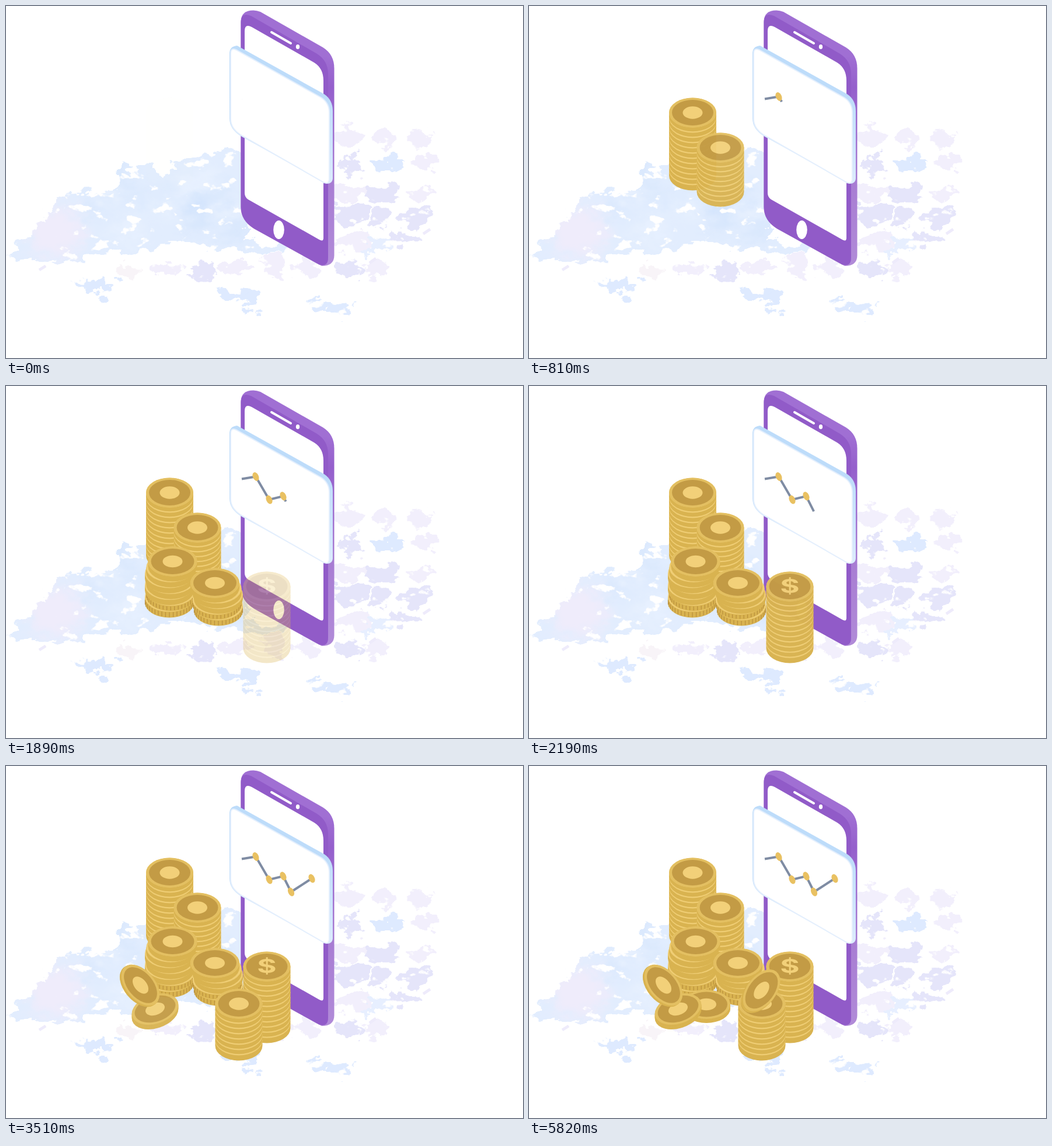
An HTML page that plays this animation: 886 by 604 pixels, repeating every 5850 ms.

```html
<!DOCTYPE html>
<html lang="en">
<head>
<meta charset="utf-8">
<title>Coins and phone</title>
<style>
  html, body { margin: 0; width: 100%; height: 100%; overflow: hidden; background: #fff; }
  svg { position: absolute; left: 0; top: 0; width: 886px; height: 604px; }
  #backdrop { will-change: transform; }
  text { font: 700 51px Inter, Arial, sans-serif; text-anchor: middle; }
</style>
</head>
<body>
<svg id="backdrop" viewBox="0 0 886 604">
  <defs>
    <filter id="ragged" filterUnits="userSpaceOnUse" x="0" y="180" width="886" height="380" color-interpolation-filters="sRGB">
      <feTurbulence type="fractalNoise" baseFrequency=".035 .05" numOctaves="4" seed="7" result="noise"/>
      <feDisplacementMap in="SourceGraphic" in2="noise" scale="44" xChannelSelector="R" yChannelSelector="G" result="torn"/>
      <feColorMatrix in="noise" values="0 0 0 0 0  0 0 0 0 0  0 0 0 0 0  0 0 14 0 -4"/>
      <feComposite in="torn" operator="in"/>
    </filter>
    <filter id="soft" x="-50%" y="-50%" width="200%" height="200%"><feGaussianBlur stdDeviation="12"/></filter>
    <clipPath id="cloudShape">
      <path id="cloud" d="M0 430Q60 375 95 322L190 318 195 270 270 285 355 247 410 258V402L475 405 470 430 300 408 80 441Z"/>
    </clipPath>
  </defs>
  <g filter="url(#ragged)">
    <use href="#cloud" fill="#e2edfe"/>
    <g clip-path="url(#cloudShape)"><g id="tints" filter="url(#soft)"></g></g>
    <g id="islands"></g>
  </g>
  <path stroke="#eeebfb" stroke-width="5" d="M57 453L68 446M715 391L727 383M623 441L634 433"/>
</svg>

<svg viewBox="0 0 886 604">
  <defs>
    <linearGradient id="phoneSide" x1="0" y1="0" x2="0" y2="1">
      <stop offset=".18" stop-color="#a06fd3"/><stop offset=".3" stop-color="#955fcc"/>
      <stop offset=".62" stop-color="#a67ad2"/><stop offset="1" stop-color="#b18bd8"/>
    </linearGradient>
    <linearGradient id="cardSide" x1="0" y1="0" x2="0" y2="1">
      <stop offset=".35" stop-color="#bddcfa"/><stop offset="1" stop-color="#dcebfd"/>
    </linearGradient>
  </defs>

  <path fill="url(#phoneSide)" d="M402.500 27Q402.500 7.500 424 7.500Q430 7.500 436 10L543 71Q562.500 83 562.500 107V428Q562.500 446 541 446L425 382Q402.500 368 402.500 345Z"/>
  <path fill="#915bc8" d="M402.500 28Q402.500 10 420 17L533 82Q552 94 552 117V432Q552 448 537 444L425 382Q402.500 368 402.500 345Z"/>
  <path fill="#fff" d="M409 43Q409 30 421 36L528 97Q544 107 544 128V398Q544 405 537 401L415 332Q409 328 409 321Z"/>
  <path stroke="#fff" stroke-width="4" stroke-linecap="round" d="M455 45L488 64"/>
  <ellipse cx="500" cy="70" rx="3.2" ry="4" fill="#fff"/>
  <ellipse cx="467.5" cy="384" rx="9.3" ry="16" fill="#fff"/>

  <path fill="url(#cardSide)" d="M383 80Q384 69 396 68L545 151Q560 161 560 180V295Q560 305 549 305L402 223Q383 211 383 193Z"/>
  <path fill="#fff" stroke="#e4effd" stroke-width="2" d="M385 82Q385 71 394 75L540 157Q554 166 554 183V297Q554 306 545 303L402 221Q385 210 385 194Z"/>

  <path id="trend" fill="none" stroke="#7f8ca3" stroke-width="4"/>
  <g id="dots" fill="#e9c162"></g>
  <g id="coins"></g>
</svg>

<script>
const LOOP = 5850, FADE = 450, TREND = 7 * FADE;
const GOLD = { side: '#d9b350', light: '#efcd74', rim: '#e3bf61', face: '#c39b45', mark: '#f2d079', ridge: '#b98f3c' };
const WASH = ['#f2effc', '#e7efff', '#e5e5fa', '#deeaff', '#f8f4f8'];
const byId = id => document.getElementById(id);
const times = (n, make) => Array.from({ length: n }, (_, i) => make(i));

let seed = 11;
function random(min, max) {
  seed = (seed * 16807) % 2147483647;
  return min + (max - min) * seed / 2147483647;
}
const jitter = (value, spread) => value + random(-spread, spread);

const ellipse = (x, y, rx, ry, fill) => `<ellipse cx="${x}" cy="${y}" rx="${rx}" ry="${ry}" fill="${fill}"/>`;

// Watercolour: lilac at the left of the cloud, blue towards the phone.
byId('tints').innerHTML = ellipse(85, 388, 50, 45, '#efecfb') + ellipse(340, 322, 42, 26, '#c8defb') +
  times(16, i => ellipse(140 + i * 17, jitter(345, 60), 26, 18, i % 2 ? '#d8e7fd' : '#e9f2ff')).join('');

const island = (x, y, color, size = 1) =>
  ellipse(jitter(x, 6), jitter(y, 6), size * random(19, 29), size * random(13, 18), color);
const rightField = times(17, i => {
  const row = Math.floor(i / 3), column = i % 3;
  return island(590 + column * (62 - row * 3), 226 + row * 45, WASH[(row * 2 + column * (row % 3)) % 4]);
});
const lowerRow = times(6, i => island(208 + i * 61, 450, WASH[i % 2 ? 0 : 4 - i], .9));
const lowerBlue = [[160, 483], [400, 500], [555, 519]].map(([x, y]) =>
  ellipse(x - 14, y - 6, 25, 10, WASH[3]) + ellipse(x + 18, y + 5, 18, 13, WASH[3]));
byId('islands').innerHTML = [...rightField, ...lowerRow, ...lowerBlue].join('');

// A face is a circle seen at an angle; its mark lies in the same plane.
function face(rx, ry, mark) {
  const sign = mark === '$'
    ? `<text y="18" fill="${GOLD.mark}">$</text>`
    : `<circle r="17" fill="${GOLD.mark}"/>`;
  return ellipse(0, 0, rx, ry, GOLD.rim) + ellipse(0, 0, rx - 5, ry - 3.5, GOLD.face) +
    `<g transform="scale(1 ${ry / rx})">${sign}</g>`;
}

function ridges(x, y, rx, ry, height) {
  const lines = times(19, i => {
    const angle = Math.PI * (i + 1) / 20;
    return `M${x + rx * Math.cos(angle)} ${y + ry * Math.sin(angle) + 1}v${height - 2}`;
  });
  return `<path stroke="${GOLD.ridge}" stroke-width="1.2" d="${lines.join('')}"/>`;
}

function disc(x, y, rx, ry, height, ridged) {
  return `<path fill="${GOLD.side}" d="M${x - rx} ${y}v${height}a${rx} ${ry} 0 0 0 ${2 * rx} 0v${-height}Z"/>` +
    (ridged ? ridges(x, y, rx, ry, height) : '') + ellipse(x, y, rx, ry, GOLD.light);
}

// A messy stack leans by `lean` pixels below its top coin and has ridged lower coins.
function stack(x, top, bottom, count, { mark, lean = 0 } = {}) {
  const step = (bottom - top) / count, ry = 25.5, rx = lean ? 42 : 40.5;
  const coins = times(count, i => {
    const shift = lean * (i ? .8 + .2 * Math.cos(i * Math.PI) : 0);
    const gap = i === count - 1 ? 0 : lean ? 1.3 : 2.2;
    return disc(x + shift, top + i * step, rx, ry, step - gap, lean && i > count - 3);
  });
  return coins.reverse().join('') + `<g transform="translate(${x} ${top})">${face(rx, ry, mark)}</g>`;
}

function loose(x, y, angle, dx, dy) {
  const place = (k, body) => `<g transform="translate(${x + dx * k} ${y + dy * k}) rotate(${angle})">${body}</g>`;
  const edge = times(8, i => place(1 - i / 8, ellipse(0, 0, 41, 25, GOLD.side)));
  return edge.join('') + place(0, face(41, 25));
}

// Listed back to front; order is the turn in which each one fades in.
const pieces = [
  { order: 0, body: stack(280.5, 183, 291, 12) },
  { order: 1, body: stack(328, 243, 319, 9) },
  { order: 2, body: stack(285.5, 301, 372, 7, { lean: -5.5 }) },
  { order: 3, body: stack(358, 338, 386, 5, { lean: 6 }) },
  { order: 4, body: stack(447, 344, 450, 12, { mark: '$' }) },
  { order: 5, body: stack(399, 408, 480, 8) },
  { order: 8, body: loose(304, 409, 0, 0, 7) },
  { order: 7, body: loose(255.5, 417, -18, 0, 8) },
  { order: 6, body: loose(230.5, 376, 50, -3, 2) },
  { order: 9, body: loose(398.5, 385, -52, -3, 3) }
];
byId('coins').innerHTML = pieces.map(p => `<g>${p.body}</g>`).join('');
const coinGroups = [...byId('coins').children];

const points = [[404, 159.5], [428, 155.5], [451, 195], [475, 189], [488.5, 216], [524, 193]];
const reach = points.map((_, i) => points.slice(1, i + 1)
  .reduce((sum, [x, y], k) => sum + Math.hypot(x - points[k][0], y - points[k][1]), 0));
const trendLength = reach[reach.length - 1];
const trend = byId('trend');
trend.setAttribute('d', 'M' + points.join('L'));
byId('dots').innerHTML = points.slice(1)
  .map(([x, y]) => `<ellipse rx="5" ry="7.8" transform="translate(${x} ${y}) rotate(-25)"/>`).join('');
const dotNodes = [...byId('dots').children];

const clamp = v => Math.min(1, Math.max(0, v));
const easeOut = p => Math.sin(p * Math.PI / 2);
const gentleInOut = p => (p + (1 - Math.cos(p * Math.PI)) / 2) / 2;

function draw(now) {
  const t = now % LOOP;
  pieces.forEach(({ order }, i) => coinGroups[i].setAttribute('opacity', easeOut(clamp(t / FADE - order))));
  const drawn = gentleInOut(clamp(t / TREND)) * trendLength;
  trend.setAttribute('stroke-dasharray', `${drawn} ${trendLength + 1}`);
  dotNodes.forEach((dot, i) => dot.setAttribute('opacity', drawn >= reach[i + 1] - .01 ? 1 : 0));
}

const start = performance.now();
function tick() {
  draw(performance.now() - start);
  requestAnimationFrame(tick);
}
tick();
</script>
</body>
</html>
```
